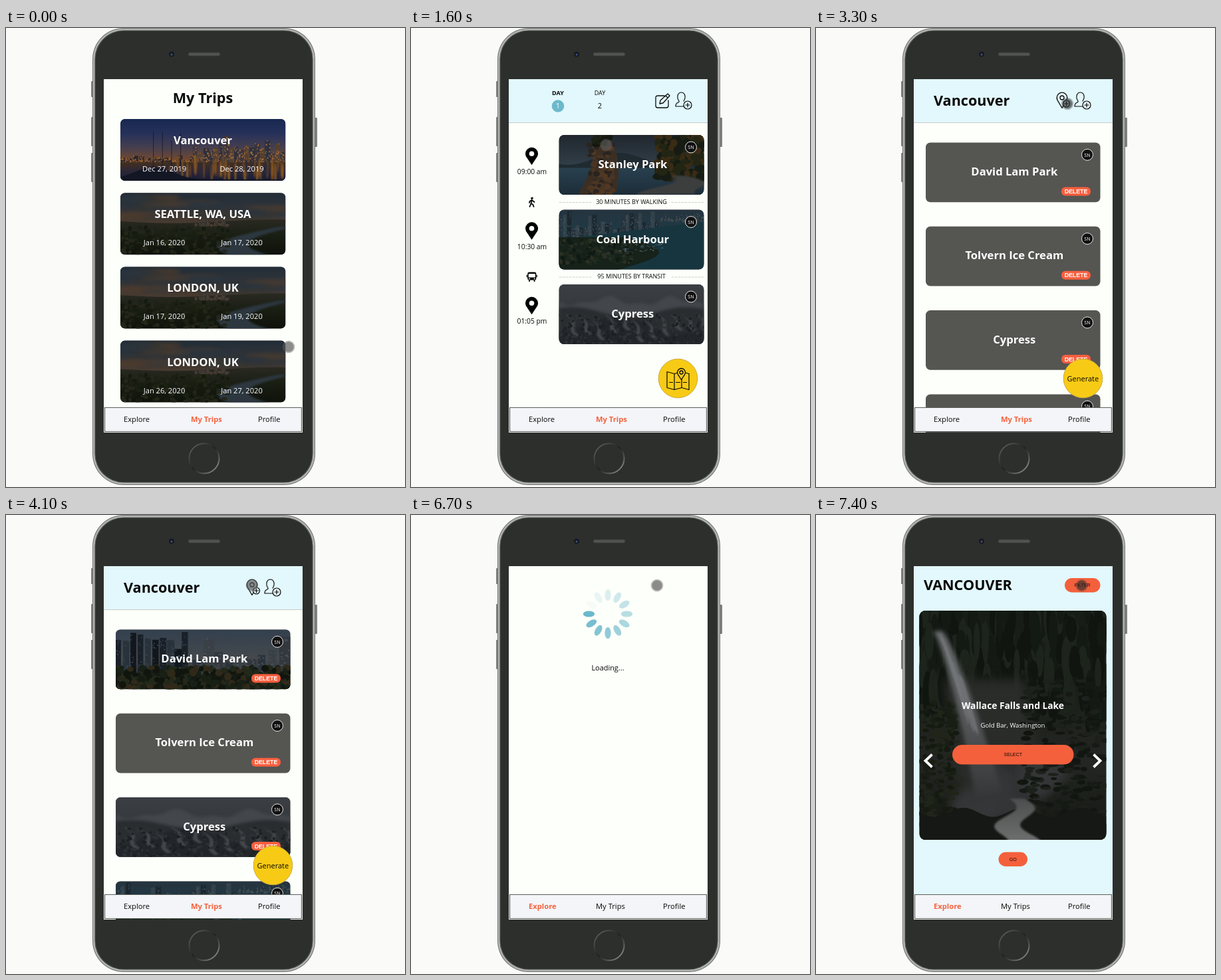
An HTML page with a canvas that plays this animation: 600 by 691 pixels, repeating every 8 s.

```html
<!DOCTYPE html>
<html lang="en">
<head>
<meta charset="utf-8">
<title>Trip planner</title>
<style>
html, body { margin: 0; width: 100%; height: 100%; overflow: hidden; background: #fafaf8; }
canvas { display: block; }
</style>
</head>
<body>
<canvas id="stage" width="600" height="691"></canvas>
<script>
const c = document.getElementById('stage').getContext('2d');
const LOOP = 8000, STEP = 100, { sin, PI } = Math;
const PAPER = '#fdfffa', ICE = '#e2f8fd', ORANGE = '#f4603c', YELLOW = '#f7cb15', INK = '#080808';
const UI = "'Open Sans', 'Noto Sans', sans-serif", ARIAL = "'Liberation Sans', Arial, sans-serif";

// ---------- helpers ----------
let seed = 1;
const rnd = (a = 0, b = 1) => a + (b - a) * (seed = seed * 16807 % 2147483647) / 2147483647;

function paint(fill, stroke, lw = 1) {
  if (fill) { c.fillStyle = fill; c.fill(); }
  if (stroke) { c.strokeStyle = stroke; c.lineWidth = lw; c.stroke(); }
}
function box(x, y, w, h, r, fill, stroke, lw) {
  c.beginPath();
  c.roundRect(x, y, w, h, r);
  paint(fill, stroke, lw);
}
function disc(x, y, r, fill, stroke, lw) {
  box(x - r, y - r, 2 * r, 2 * r, r, fill, stroke, lw);
}
function text(s, x, y, size, color = INK, weight = 500, align = 'center', font = UI) {
  c.font = `${weight} ${size}px ${font}`;
  c.textAlign = align;
  c.fillStyle = color;
  c.fillText(s, x, y);
}
function icon(d, x, y, lw = 1.2, color = INK) {
  c.save();
  c.translate(x, y);
  c.lineJoin = c.lineCap = 'round';
  c.strokeStyle = color;
  c.lineWidth = lw;
  c.stroke(new Path2D(d));
  c.restore();
}
function pin(x, y, r, tail, hole, fill, stroke) {
  c.beginPath();
  c.arc(x, y, r, .86 * PI, .14 * PI);
  c.lineTo(x, y + tail);
  c.closePath();
  c.lineJoin = 'round';
  paint(fill, stroke, 1.3);
  disc(x, y, hole, stroke ? null : PAPER, stroke, 1.3);
}
function plus(x, y, r) {
  disc(x, y, r, ICE, INK, 1.2);
  icon('M-3 0h6M0-3v6', x, y);
}

// ---------- pictures, drawn in a unit square ----------
function fade(y0, y1, ...colors) {
  const g = c.createLinearGradient(0, y0, 0, y1);
  colors.forEach((k, i) => g.addColorStop(i / (colors.length - 1), k));
  return g;
}
function shade(y0, y1, ...colors) {
  c.fillStyle = fade(y0, y1, ...colors);
  c.fillRect(0, y0, 1, y1 - y0);
}
// Everything below the line y = f(x).
function ridge(color, f) {
  c.beginPath();
  c.moveTo(0, 1);
  for (let x = 0; x <= 1.001; x += .02) c.lineTo(x, f(x));
  c.lineTo(1, 1);
  paint(color);
}
// A band running down from y0 to y1, given its middle and half width.
function ribbon(color, y0, y1, mid, half) {
  c.beginPath();
  for (let i = 0; i <= 40; i++) {
    const u = i <= 20 ? i / 20 : (40 - i) / 20, side = i <= 20 ? -1 : 1;
    c.lineTo(mid(u) + side * half(u), y0 + (y1 - y0) * u);
  }
  paint(color);
}
function specks(n, x0, y0, x1, y1, w, h, ...colors) {
  for (let i = 0; i < n; i++) {
    c.beginPath();
    c.ellipse(rnd(x0, x1), rnd(y0, y1), w * rnd(.3, .6), h * rnd(.3, .6), 0, 0, 7);
    paint(colors[i % colors.length]);
  }
}
function towers(n, x0, x1, base, low, high, lights, ...colors) {
  for (let i = 0; i < n; i++) {
    const x = x0 + (x1 - x0) * i / n, w = (x1 - x0) / n * rnd(.7, 1.1), h = rnd(low, high);
    c.fillStyle = colors[i % colors.length];
    c.fillRect(x, base - h, w, h);
    specks(12, x, base - h, x + w * .9, base, w * .25, .025, lights);
  }
}
function soft(px, draw) {
  c.filter = `blur(${px}px)`;
  draw();
  c.filter = 'none';
}

const pictures = {
  dusk() {
    shade(0, .7, '#182850', '#26315a', '#463f4e', '#7a4a2a');
    towers(12, 0, .46, .7, .02, .12, '#94602f', '#2a2630', '#33292c');
    towers(18, .44, 1, .7, .15, .45, '#a06c3c', '#3a343c', '#54402f', '#2e303c');
    shade(.7, 1, '#43301f', '#2b2638', '#171c35');
    soft(1, () => specks(60, .3, .72, 1, .9, .012, .3, '#7d4e22', '#2c2a3a', '#936022'));
    for (let x = .2; x < .4; x += .055) icon(`M${x} ${rnd(.2, .4)}V.8`, 0, 0, .004, '#12141c');
    ridge('#131724', x => .98 - .2 * Math.exp(-(((x - .2) / .16) ** 2)));
  },
  river() {
    shade(0, .5, '#222d37', '#30343a', '#4a3c30');
    soft(3, () => specks(22, 0, .08, 1, .42, .3, .08, '#4b3b2e', '#28343f', '#373632'));
    ridge(fade(.4, 1, '#2c2b24', '#191e13', '#0e120b'), x => .46 + .03 * sin(x * 5));
    towers(9, .45, .66, .54, .02, .1, '#4d4136', '#37332f');
    soft(1.5, () => ribbon('#2c373f', .55, 1.05, u => 1 - .32 * sin(u * 2.6), u => .04 + .09 * u));
    specks(200, 0, .55, .65, 1, .03, .06, '#151a0f', '#24261a', '#1b2113');
  },
  coast() {
    shade(0, .55, '#20272e', '#33404a');
    ridge('#1f2a31', x => .4 + .1 * sin(x * 9 + 1));
    shade(.55, 1, '#28404f', '#1d2d38');
    ribbon('#3b2f24', .05, 1, u => .29 + .03 * sin(u * 4), u => .06 + .07 * u);
    specks(90, .21, .15, .37, 1, .04, .08, '#4a3524', '#2a2420', '#513823');
    specks(30, .24, 0, .37, .16, .05, .1, '#14180f', '#1b2114');
    specks(160, .68, 0, 1, .75, .07, .14, '#161c13', '#3a2b15', '#222513');
    soft(1, () => ribbon('#3c3e3e', .68, 1, u => .82 + .08 * sin(u * 5), u => .05 + .16 * u));
  },
  harbour() {
    shade(0, 1, '#26343f', '#1b3c47', '#12262d');
    towers(25, 0, .72, .5, .15, .48, '#45545c', '#26333d', '#33414a', '#1b272f');
    towers(12, .7, 1, .2, .04, .14, '#43525a', '#25323a');
    ridge('#17353e', x => .5 - .3 * x);
    ribbon('#16221a', .46, 1.1, u => .12, u => .35 + .22 * sin(u * 4));
    specks(140, 0, .5, .5, .9, .03, .06, '#1d291c', '#2b3024', '#101a14');
    specks(40, .42, .5, .72, .7, .02, .02, '#56626a', '#2b3f46');
  },
  snow() {
    shade(0, 1, '#3b3f44', '#34383c', '#202325');
    soft(2, () => {
      ridge('#43474b', x => .28 + .06 * sin(x * 14) + .03 * sin(x * 31));
      ridge('#292d30', x => .46 + .08 * sin(x * 8 + 4));
      ridge('#22262a', x => .68 + .14 * sin(x * 7 + 2));
    });
    soft(1, () => {
      for (let x = .05; x < .95; x += .09)
        ribbon('#42464a', rnd(.5, .62), rnd(.75, .98), u => x + .09 * u + .02 * sin(u * 6), u => .006 + .012 * u);
    });
    specks(220, 0, .5, 1, 1, .02, .05, '#1c2022', '#2d3134');
  },
  park() {
    shade(0, 1, '#33404f', '#45494d', '#20251d');
    towers(10, 0, .42, .78, .4, .78, '#35434c', '#1a2028', '#28323b', '#12171e');
    towers(9, .44, 1, .75, .2, .66, '#474f55', '#2b343b', '#3a4146', '#32383e');
    ridge('#151b13', x => .72 + .05 * sin(x * 17));
    specks(260, 0, .64, 1, 1, .04, .12, '#182015', '#23291a', '#30291a', '#10150e');
  },
  cones(w, h) {
    shade(0, 1, '#060606', '#0d0c0b');
    c.scale(1 / w, 1 / h);
    soft(1.6, () => {
      text('TOLVERN', w * .53, 11, 36, '#62605e', 800);
      text('ICE CREAM', w * .53, 49, 36, '#5c5a58', 800);
    });
    soft(1, () => [.34, .69].forEach(k => {
      disc(w * k, h * .78, 33, '#4a3d34');
      disc(w * k, h * .6, 24, '#53463c');
      specks(50, w * k - 30, h * .45, w * k + 30, h, 9, 7, '#63564a', '#382b23');
    }));
  },
  falls() {
    shade(0, 1, '#161c16', '#1b1f19', '#242623', '#141612');
    specks(260, 0, 0, 1, .45, .05, .16, '#131913', '#1d241c', '#101510');
    soft(8, () => {
      ribbon('#2a2c29', .3, .85, u => .35 + .1 * u, u => .22);
      specks(9, .28, .7, .68, .86, .22, .16, '#343637');
    });
    specks(260, 0, .4, .2, 1, .04, .02, '#151a11', '#20251a', '#191e14');
    specks(320, .55, .3, 1, 1, .05, .02, '#151a14', '#1d211b', '#121611');
    const drop = u => .1 + .28 * u ** .8;
    soft(3, () => ribbon(fade(.1, .82, '#696b6c', '#56585a', '#343637'), .09, .82, drop, u => .025 + .05 * u));
    soft(1, () => {
      for (let i = 0; i < 18; i++) {
        const shift = rnd(-.03, .025), top = rnd(.1, .3);
        ribbon('#77797a66', top, top + .25, u => drop((top + .25 * u - .09) / .73) + shift, u => .006);
      }
    });
    ridge('#161815', x => .88 + .02 * sin(x * 20));
    soft(1.5, () => ribbon(fade(.82, 1, '#4c4e4e', '#6c6d6d'), .82, 1.02, u => .52 + .05 * sin(u * 8), u => .04 + .05 * u));
  }
};

function card(x, y, w, h, r, name) {
  box(x, y, w, h, r, '#555552');
  if (!name) return;
  c.save();
  c.clip();
  c.translate(x, y);
  c.scale(w, h);
  seed = 77 + name.length * 991;
  pictures[name](w, h);
  c.restore();
}

// ---------- shared parts ----------
function phone() {
  c.fillStyle = '#fafaf8';
  c.fillRect(0, 0, 600, 691);
  [[80, 24], [134, 44], [188, 44]].forEach(([y, h]) => box(128, y, 5, h, 1, '#7d807c'));
  box(462, 135, 6, 44, 1, '#7d807c');
  const glow = c.createLinearGradient(140, 10, 250, 90);
  glow.addColorStop(0, '#343634');
  glow.addColorStop(1, '#252524');
  Object.entries({ 0: '#6e716d', 1: '#b2b5b1', 3.4: '#50524f', 4.6: '#2d2f2d', 8: glow }).forEach(([k, fill]) =>
    box(130 + +k, +k, 335 - 2 * k, 688 - 2 * k, 47 - k, fill));
  box(274, 37, 48, 5, 2.5, '#525350', '#3a3b39');
  disc(249, 39.5, 4, '#171a20');
  disc(249, 40, 1.5, '#3d5488');
  const ring = c.createLinearGradient(282, 632, 314, 664);
  ['#555653', '#1f1f1e', '#7c7d7a'].forEach((k, i) => ring.addColorStop(i / 2, k));
  disc(298, 648, 22.5, null, ring, 2);
}
function tabs(active) {
  box(148.5, 571.5, 296, 36, 0, '#f4f5f8', '#5b5e5c', 1.2);
  ['Explore', 'My Trips', 'Profile'].forEach((s, i) => {
    const on = i === active;
    text(s, 177 + i * 101, 593, 11.2, on ? '#f5623f' : INK, on ? 700 : 500, 'left');
  });
}
function status() {
  box(147, 590, 97.5, 18, [0, 3, 0, 0], '#272b2c');
  text('Waiting for lo…', 151, 603, 12.1, '#a9abab', 400, 'left');
}
function header() {
  c.fillStyle = ICE;
  c.fillRect(147, 77, 299, 65);
  c.fillStyle = '#c3cbcc';
  c.fillRect(147, 142, 299, 1);
}
function badge(x, y) {
  disc(x, y, 8.5, '#111', '#e8e8e8');
  text('SN', x, y + 2.7, 7.2, '#fff');
}
function pill(s, x, y, w, h) {
  box(x, y, w, h, h / 2, ORANGE);
  text(s, x + w / 2, y + h / 2 + 2.3, 7.1, '#1d0a06', 400, 'center', ARIAL);
}
function person(x) {
  icon('M13 22H1c0-8 6-4 5-8C2 8 4 1 9.500 1s7.500 7 3.500 13', x, 96);
  plus(x + 19, 116, 6);
}
function heading(s, x, y, align = 'left') { text(s, x, y, 21.6, INK, 700, align); }
function label(s, x, y, size = 16.6) { text(s, x, y, size, '#fff', 700); }
function button() { disc(401.5, 527.5, 29.3, YELLOW, '#c9aa3c'); }

// ---------- views ----------
function trips() {
  heading('My Trips', 296, 112.5, 'center');
  ['Vancouver|Dec 27, 2019|Dec 28, 2019', 'SEATTLE, WA, USA|Jan 16, 2020|Jan 17, 2020',
   'LONDON, UK|Jan 17, 2020|Jan 19, 2020', 'LONDON, UK|Jan 26, 2020|Jan 27, 2020'].forEach((row, i) => {
    const y = 137 + i * 111.2, [name, from, to] = row.split('|');
    card(172, y, 248.3, 93, 7, i ? 'river' : 'dusk');
    label(name, 296, y + 38);
    text(from, 238, y + 79, 11.1, '#fff');
    text(to, 354.5, y + 79, 11.1, '#fff');
  });
}

function spinner(t) {
  const head = Math.floor((t - 6700) * 12 / 1000) + 6;
  for (let k = 0; k < 12; k++) {
    const age = ((head - k) % 12 + 12) % 12;
    c.save();
    c.translate(296, 149);
    c.rotate(k * PI / 6);
    c.globalAlpha = 1 - age / 11.6;
    c.beginPath();
    c.ellipse(28.5, 0, 8.7, 4.6, 0, 0, 7);
    paint('#6cb8cc');
    c.restore();
  }
  text('Loading...', 296, 234, 10.9);
}

function walker(x, y) {
  disc(x + .5, y - 5.7, 1.7, INK);
  icon('M0-3L-1 2L2 4L3 7M-1 2L-3 7M-3.500 1L-3-1L0-3L4 0', x, y, 1.8);
}
function bus(x, y) {
  box(x - 6.5, y - 7, 13, 12, 2.5, INK);
  box(x - 5, y - 4.5, 10, 5.5, 1, PAPER);
  [-1, 1].forEach(side => {
    disc(x + side * 3.8, y + 3, .9, PAPER);
    box(x + side * 3.8 - 1, y + 4.5, 2, 3, 1, INK);
    box(x + side * 7.3 - .7, y - 3, 1.4, 4, .7, INK);
  });
}
function map(x, y) {
  for (let i = 0; i < 4; i++) {
    const rise = i % 2 ? -3 : 3;
    icon(`M0-12v24${i < 3 ? `l11 ${rise}M0-12l11 ${rise}` : ''}`, x - 16.5 + i * 11, y + 3.5 - rise / 2);
  }
  icon('M-13 6h5M-3 6h6M8 6h5', x, y);
  pin(x + 5, y - 9, 6, 11, 2.5, YELLOW, INK);
}

function day(t) {
  header();
  disc(221, 117.5, 9.3, '#6cb9cb');
  [1, 2].forEach(n => {
    const x = 158 + n * 63;
    text('DAY', x, 101, 9, INK, n === 1 ? 700 : 400);
    text(n, x, 121.3, 11, n === 1 ? '#fff' : INK);
  });
  icon('M14 4H4q-3 0-3 3v12q0 3 3 3h13q3 0 3-3V11M7 16l1-5L19 1l3 3L12 15zM16 4l3 3', 367, 98, 1.3);
  person(397);
  ['Stanley Park|09:00 am|coast', 'Coal Harbour|10:30 am|harbour', 'Cypress|01:05 pm|snow'].forEach((row, i) => {
    const y = 161 + i * 112.5, [name, time, pic] = row.split('|');
    card(222.5, y, 218, 90, 8, t >= 1600 && pic);
    label(name, 333.3, y + 50);
    badge(421, y + 18.5);
    pin(181.5, y + 28.3, 9.5, 17, 3.8, '#000');
    text(time, 182, y + 59, 10.3);
  });
  ['30 MINUTES BY WALKING', '95 MINUTES BY TRANSIT'].forEach((s, i) => {
    const y = 262.5 + i * 112.5;
    text(s, 331.5, y + 2.3, 9);
    c.setLineDash([3, 2]);
    icon('M223 0H272M392 0H440', 0, y, .8, '#c4c6c2');
    c.setLineDash([]);
  });
  walker(181.5, 262);
  bus(181.8, 374.5);
  button();
  map(401.5, 527.5);
}

function edit(t) {
  header();
  heading('Vancouver', 177, 117);
  pin(370, 105, 7.8, 15.5, 3, null, INK);
  plus(376.5, 114, 5);
  person(388);
  ['David Lam Park|park|3700', 'Tolvern Ice Cream|cones|4300', 'Cypress|snow|3400',
   'Coal Harbour|harbour|3500'].forEach((row, i) => {
    const y = 172.5 + i * 126.3, [name, pic, ready] = row.split('|');
    card(165, y, 262.5, 89.7, 7, t >= ready && pic);
    label(name, 298.3, y + 49.5);
    badge(408, y + 18.3);
    box(369, y + 67, 44, 13, 6, '#f95f3f');
    text('DELETE', 391, y + 76.6, 8.8, '#fff', 700, 'center', ARIAL);
  });
  button();
  text('Generate', 401.3, 531.5, 11);
}

function explore(t) {
  c.fillStyle = ICE;
  c.fillRect(147, 77, 299, 494);
  heading('VANCOUVER', 162, 112.5);
  pill('FILTER', 374, 95, 53.5, 21.5);
  card(155.5, 144, 281, 345, 9, t >= 7400 && 'falls');
  label('Wallace Falls and Lake', 296, 292.3, 13.8);
  text('Gold Bar, Washington', 296, 320, 9.6, '#fff');
  pill('SELECT', 205, 346, 182.5, 29.5);
  [-1, 1].forEach(side => {
    c.beginPath();
    [-1, 0, 1].forEach(k => c.lineTo(296 + side * (k ? 121.5 : 131.5), 370 + k * 9.5));
    c.lineJoin = 'miter';
    paint(null, '#fff', 3.8);
  });
  pill('GO', 274.5, 507.5, 43.5, 21.5);
}

// ---------- pointer: each leg bends towards an optional control point ----------
const legs = [
  { from: 0, to: 600, end: [293.5, 176], bend: [150, 570] },
  { from: 1700, to: 2200, end: [393, 103], bend: [500, 340] },
  { from: 2500, to: 2700, end: [378, 114] },
  { from: 3600, to: 3700, end: [370, 106] },
  { from: 7200, to: 7400, end: [399.5, 106] }
];
function pointer(t) {
  let at = [425, 480];
  for (const { from, to, end, bend } of legs) {
    const u = Math.min(1, Math.max(0, (t - from) / (to - from)));
    at = at.map((a, i) => {
      const b = bend ? bend[i] : (a + end[i]) / 2;
      return a * (1 - u) ** 2 + 2 * b * u * (1 - u) + end[i] * u * u;
    });
  }
  const pressed = t >= 2700 && t < 3600 || t >= 7400;
  disc(...at, 9.3, pressed ? 'rgba(70,70,70,.35)' : 'rgba(100,100,100,.45)');
  disc(...at, 7.5, pressed ? 'rgba(30,30,30,.45)' : 'rgba(85,85,85,.45)');
}

// ---------- timeline ----------
function draw(t) {
  phone();
  c.save();
  c.beginPath();
  c.rect(147, 77, 299, 532);
  c.clip();
  c.fillStyle = PAPER;
  c.fillRect(147, 77, 299, 532);
  const scenes = [[1100, trips], [1200, status], [1500, spinner], [3300, day], [5900, edit],
    [6000, () => {}], [6800, spinner], [LOOP, explore]];
  scenes.find(([end]) => t < end)[1](t);
  tabs(t < 5900 ? 1 : 0);
  if (t === 1100 || t === 5800) status();
  pointer(t);
  c.restore();
}

let last = -1;
const start = performance.now();
function tick() {
  const t = Math.floor((performance.now() - start) % LOOP / STEP) * STEP;
  if (t !== last) draw(last = t);
  requestAnimationFrame(tick);
}
tick();
</script>
</body>
</html>
```
